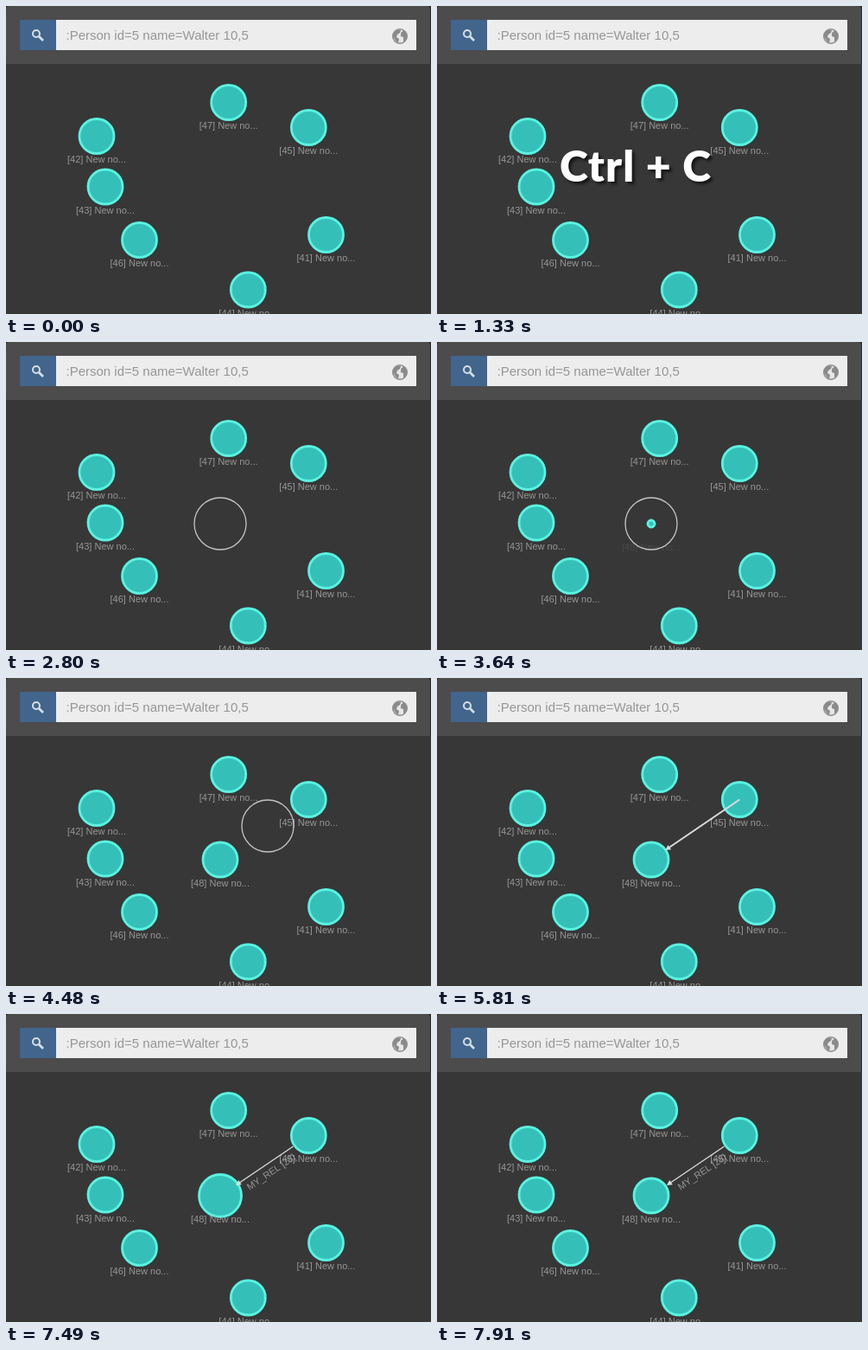
Write an HTML page with a canvas that moves like this. It is 492 by 356 pixels and loops after 8400 ms.

```html
<!DOCTYPE html>
<html lang="en">
<head>
<meta charset="utf-8">
<title>Graph editor</title>
<style>
  html, body { margin: 0; width: 100%; height: 100%; overflow: hidden; background: #373737; }
  canvas { display: block; }
</style>
</head>
<body>
<canvas id="stage" width="492" height="356"></canvas>
<script>
const ctx = document.getElementById('stage').getContext('2d');
const LOOP = 8400, STEP = 70;
const SANS = '"Liberation Sans", Arial, sans-serif';
const from = { id: 45, x: 350.3, y: 140.5 };
const to = { id: 48, x: 248, y: 210 };
const others = [
  [42, 105, 150.5], [43, 115, 209], [46, 154.5, 270.5],
  [47, 257.7, 111.5], [41, 370.5, 264.5], [44, 280.3, 328]
].map(([id, x, y]) => ({ id, x, y }));

let now = 0;
const ramp = (a, b) => Math.min(1, Math.max(0, (now - a) / (b - a)));
const between = (a, b) => now >= a && now < b;
const mix = (a, b, k) => a + (b - a) * k;

function rect(x, y, w, h, color) {
  ctx.fillStyle = color;
  ctx.fillRect(x, y, w, h);
}

function circle(x, y, r, stroke, width, fill) {
  ctx.beginPath();
  ctx.arc(x, y, r, 0, Math.PI * 2);
  if (fill) {
    ctx.fillStyle = fill;
    ctx.fill();
  }
  ctx.strokeStyle = stroke;
  ctx.lineWidth = width;
  ctx.stroke();
}

function line(x1, y1, x2, y2, color, width) {
  ctx.beginPath();
  ctx.moveTo(x1, y1);
  ctx.lineTo(x2, y2);
  ctx.strokeStyle = color;
  ctx.lineWidth = width;
  ctx.stroke();
}

function text(str, x, y, size, color, align = 'left') {
  ctx.font = `${size}px ${SANS}`;
  ctx.textAlign = align;
  ctx.fillStyle = color;
  ctx.fillText(str, x, y);
}

function polygon(points, color) {
  ctx.beginPath();
  points.forEach(([x, y]) => ctx.lineTo(x, y));
  ctx.fillStyle = color;
  ctx.fill();
}

function globe(x, y) {
  circle(x, y, 8.2, '#8b8b8b', 1.6, '#e6e6e6');
  ctx.save();
  ctx.beginPath();
  ctx.arc(x, y, 8.5, 0, Math.PI * 2);
  ctx.clip();
  ctx.translate(x, y);
  polygon([[-9, -4], [-4, -8], [1, -7], [0, -4], [-3, -2], [-4, 1], [-1, 3], [-2, 8], [-5, 5], [-8, 0]], '#8b8b8b');
  polygon([[2, -5], [5, -7], [9, -3], [9, 2], [6, 5], [4, 6], [4, 1], [1, 0], [1, -3]], '#8b8b8b');
  ctx.restore();
}

function searchBar() {
  rect(0, 0, 492, 67, '#2b2b2b');
  ctx.beginPath();
  ctx.roundRect(0, 0, 491, 67, [4, 4, 0, 0]);
  ctx.fillStyle = '#4c4c4c';
  ctx.fill();
  rect(16, 16, 42, 35, '#41658c');
  rect(58, 16, 417, 35, '#ededed');
  circle(35, 32, 4, '#d8dfe7', 2);
  line(38, 35, 43, 40, '#d8dfe7', 2.6);
  text(':Person id=5 name=Walter 10,5', 69.5, 39, 15, '#969696');
  globe(456, 35);
}

function node({ id, x, y }, hover = 0, scale = 1) {
  if (!scale) return;
  circle(x, y, (20 + 4.5 * hover) * scale, '#5af3e2', 2.8, '#34c0b8');
  ctx.globalAlpha = scale;
  text(`[${id}] New no...`, x, y + 30.5, 11, '#979797', 'center');
  ctx.globalAlpha = 1;
}

function arrow(x1, y1, x2, y2, color, width) {
  ctx.save();
  ctx.translate(x2, y2);
  ctx.rotate(Math.atan2(y2 - y1, x2 - x1));
  line(-Math.hypot(x2 - x1, y2 - y1), 0, -3, 0, color, width);
  polygon([[0, 0], [-6, -3.2], [-6, 3.2]], color);
  ctx.restore();
}

function connection() {
  if (between(5110, 6300)) {
    const k = 1 - (1 - ramp(5110, 6160)) ** 1.67;
    arrow(from.x, from.y, mix(from.x, to.x, k), mix(from.y, to.y, k), '#dcdcdc', 2);
  } else if (now >= 6300) {
    arrow(332.5, 153, 266, 198, '#dedede', 1.3);
    ctx.save();
    ctx.translate(282, 204);
    ctx.rotate(Math.atan2(from.y - to.y, from.x - to.x));
    text('MY_REL [28]', 0, 0, 11, '#979797');
    ctx.restore();
  }
}

function pointerRing() {
  const ring = (x, y) => circle(x, y, 30, '#c4c4c4', 1.3);
  if (between(2800, 4200)) ring(248, 210);
  if (between(4480, 4550)) ring(303, 171);
  if (between(4550, 4760)) ring(331, 153);
}

function shortcut() {
  const alpha = ramp(0, 210) - ramp(1750, 2660);
  if (alpha <= 0) return;
  ctx.save();
  ctx.globalAlpha = alpha;
  ctx.font = '900 50px Lato, sans-serif';
  ctx.letterSpacing = '1px';
  ctx.textAlign = 'center';
  ctx.shadowColor = 'rgba(20, 20, 20, .9)';
  ctx.shadowBlur = 3;
  ctx.shadowOffsetX = ctx.shadowOffsetY = 3;
  ctx.fillStyle = '#fff';
  ctx.fillText('Ctrl + C', 230, 203);
  ctx.restore();
}

function draw(time) {
  now = Math.floor((time % LOOP) / STEP) * STEP;
  rect(0, 0, 492, 356, '#373737');
  searchBar();
  others.forEach(n => node(n));
  node(from, ramp(4690, 4900) - ramp(5040, 5250));
  node(to, ramp(6230, 6440) - ramp(7700, 7910), ramp(3570, 3920));
  connection();
  pointerRing();
  shortcut();
}

const start = performance.now();
function frame() {
  draw(performance.now() - start);
  requestAnimationFrame(frame);
}
frame();
</script>
</body>
</html>
```
